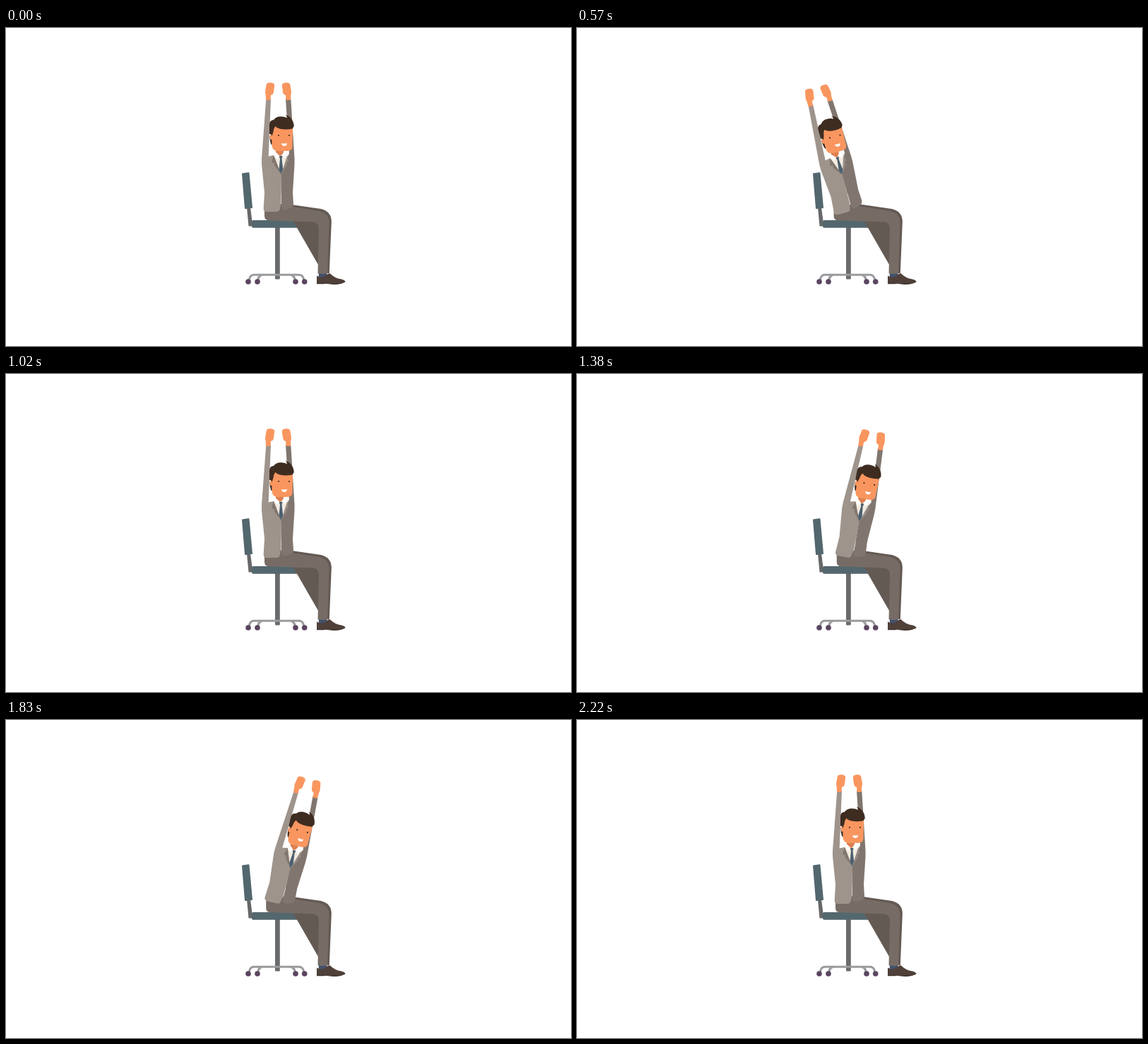
These frames come from a looping animation (800x450 px, 2250 ms). An HTML page:

```html
<!DOCTYPE html>
<html lang="en">
<head>
<meta charset="utf-8">
<title>Chair stretch</title>
<style>
html, body { margin: 0; width: 100%; height: 100%; overflow: hidden; background: #fff; }
svg { display: block; width: 100vw; height: 100vh; }
</style>
</head>
<body>
<svg viewBox="0 0 800 450">
  <defs>
    <path id="hand" fill="#f9965f" d="M369 79Q372 76 378 78Q381 79.500 380 83L378.700 92Q378 94.500 375 95L374.500 102H368L367.700 94Q366.300 91 367.500 87Z"/>
  </defs>

  <g id="chair">
    <path fill="#666768" d="M341 254H346L348.500 273V280.500H343.500Z"/>
    <path fill="#53676e" stroke="#53676e" stroke-width="2" stroke-linejoin="round" d="M335 206.500L343.500 205.300L348 254L339 255Z"/>
    <rect x="381" y="281" width="6.800" height="74.500" rx="1" fill="#696b6c"/>
    <rect x="348" y="272" width="72.300" height="10.800" rx="2" fill="#53676e"/>
    <g fill="none" stroke="#999b9d" stroke-width="3">
      <path d="M344 358Q345 349.300 351 349.300H415Q421 349.300 422 358"/>
      <path d="M356.500 358Q357 351.500 362 349.500M409.500 358Q409 351.500 404 349.500"/>
    </g>
    <g fill="#5a4460">
      <circle cx="343" cy="359" r="3.800"/><circle cx="356" cy="359" r="3.800"/>
      <circle cx="410" cy="359" r="3.800"/><circle cx="422.700" cy="359" r="3.800"/>
    </g>
  </g>

  <g id="legs">
    <path fill="#42516c" d="M442.500 345H455L453 354H443Z"/>
    <path fill="#50403a" d="M440 350.500Q446 354.500 452 351Q455.500 346.500 459 347.500Q465 354 475 355.500Q480.500 357 480.500 359.500Q473 363 464 362.500L452 361L450.500 362H440Z"/>
    <path fill="#3f312c" d="M440 361H452L464 361.500Q474 361.500 480.500 359Q475 363 464 363L452 361.700L450.500 362.300H440Z"/>
    <path fill="#645a54" d="M392 248L408 250.500L446 256Q461.500 260 460.800 275L457.800 347H449Z"/>
    <path id="trousers" fill="#766c65"/>
  </g>

  <g id="torso">
    <path fill="#81766f" d="M396 100H403.300L408.500 185V193L406 233L407 249Q407 253 404 254.500L396 257.300Q390.500 258 390 252L389 200L398 181L401 178Z"/>
    <path fill="#fff" d="M391 176L399.500 173V181L397 184ZM388.500 236H390V248L387.500 250Z"/>
    <path fill="#f3ebe0" d="M379.500 178H398.500L396 192L389.500 207L382 193Z"/>
    <path fill="#9e948c" d="M368.300 100H375L371.700 181.500L379 180L389.500 207V247L388 255Q387.500 260 383 260H369Q364.500 260 364.700 255L366 233L362 193V185Z"/>
    <path fill="#82776f" d="M379 180L376 190L380 191.500L379.500 194L389.500 207Z"/>
    <path fill="#988d85" d="M398.500 180L400 189L396.800 191L398 193.500L389.500 207Z"/>
    <path fill="#4b6070" d="M386.500 181H391.500L390.500 185L392.200 200L389.500 207L386.500 200L388 185Z"/>
    <use href="#hand"/>
    <use href="#hand" transform="matrix(-1 0 0 1 771 0)"/>

    <path fill="#de8050" d="M382 171H393V177L388 181.500L382 177Z"/>
    <path fill="#fff" d="M379.500 180L382.500 176L387.500 181L384 185ZM391 180L393 175.500L398 179.500L394 184Z"/>
    <path fill="#3e2c21" d="M373.500 153H378V165H375.500Q373.500 161 373.500 153Z"/>
    <path fill="#f9965f" d="M376 136H406L405.500 168Q405 174 398 174H384Q377 173.500 376.500 166Z"/>
    <ellipse cx="376" cy="154" rx="2.500" ry="4" fill="#f9965f"/>
    <path fill="#3e2c21" d="M373 150V136Q373.500 130.500 379 130Q382 125.300 389 125.300Q394 125.200 398 127.300Q398 125 396 123Q401 124.300 404 128.500Q407.500 133 407.800 139L405.500 142.500Q400 144 392 143.300Q384 142.500 381.300 139Q379 142 378.500 147L376.500 153Q376 149.500 373 150Z"/>
    <g fill="#3a2922"><circle cx="386" cy="152" r="1.100"/><circle cx="401" cy="152" r="1.100"/></g>
    <path fill="#fff" d="M390 163Q394 164 398 163Q397.700 167 394 167Q390.700 167 390 163Z"/>
  </g>
</svg>
<script>
const LOOP = 2250, STEP = 30, MAX_LEAN = 15;
const torso = document.getElementById('torso');
const trousers = document.getElementById('trousers');

// start, end, lean before, lean after
const moves = [
  [0, 435, 0, -1],
  [545, 1010, -1, 0],
  [1170, 1620, 0, 1],
  [1770, 2220, 1, 0]
];

// Cubic timing curve (.33, 0, .25, 1), solved by bisection.
function ease(u) {
  let low = 0, high = 1;
  for (let i = 0; i < 24; i++) {
    const s = (low + high) / 2, r = 1 - s;
    const x = 3 * r * r * s * 0.33 + 3 * r * s * s * 0.25 + s * s * s;
    if (x < u) low = s; else high = s;
  }
  return low * low * (3 - 2 * low);
}

function leanAt(time) {
  let lean = 0;
  for (const [start, end, from, to] of moves) {
    if (time < start) break;
    lean = from + (to - from) * ease(Math.min(1, (time - start) / (end - start)));
  }
  return lean;
}

function draw(time) {
  const lean = leanAt(Math.floor(time % LOOP / STEP) * STEP);
  const hip = 366 + 2.4 * lean;
  torso.setAttribute('transform', `rotate(${lean * MAX_LEAN} 385 261)`);
  trousers.setAttribute('d', `M${hip} 256L390 249L402 252.500L443 259Q458 262 457.500 277L455 347
    Q448 349 441.500 347L443 284Q443 275 434 274.500L${hip + 6} 272.300Q${hip} 272 ${hip} 266Z`);
}

const begin = performance.now();
function tick() {
  draw(performance.now() - begin);
  requestAnimationFrame(tick);
}
draw(0);
requestAnimationFrame(tick);
</script>
</body>
</html>
```
